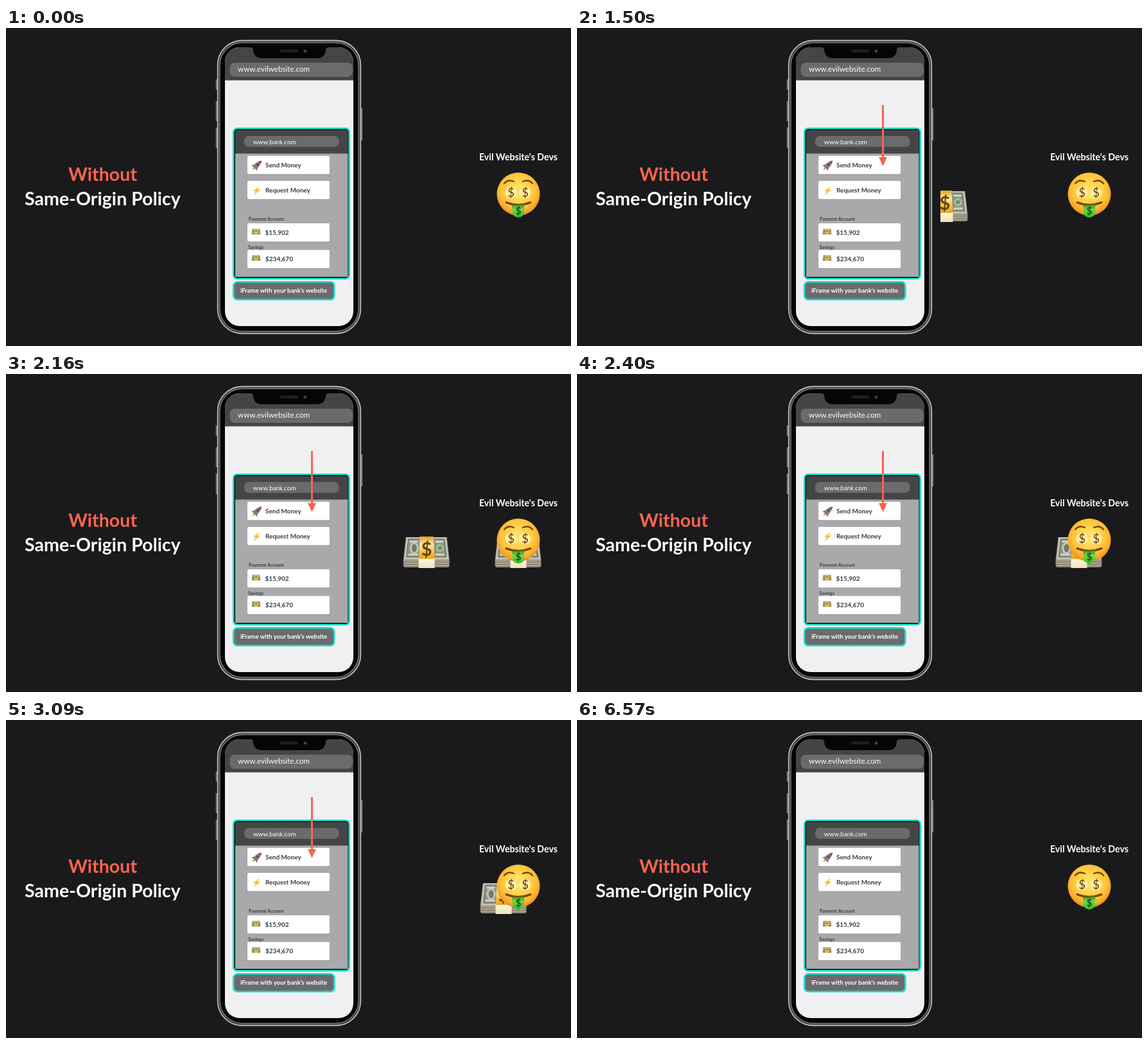
An HTML page that plays this animation: 880x495 px, repeating every 6.6 s.

```html
<!DOCTYPE html>
<html lang="en">
<head>
<meta charset="utf-8">
<title>Without Same-Origin Policy</title>
<style>
  html, body { margin: 0; height: 100%; overflow: hidden; background: #1a1a1c; }
  svg { display: block; width: 880px; height: 495px; font-family: Lato, sans-serif; fill: #fff; }
  .bold { font-weight: 700; }
  .mid { text-anchor: middle; }
  .title { font-size: 28.6px; }
  .dark { fill: #3c3c3e; }
  .item { font-size: 10px; }
  .tiny { font-size: 7px; }
  .pill { fill: #6b6b6d; }
  .teal { stroke: #14e0c9; stroke-width: 2.6; }
  .ink { fill: none; stroke: #7d3f0a; stroke-linecap: round; }
</style>
</head>
<body>
<svg viewBox="0 0 880 495">
  <defs>
    <radialGradient id="skin" cy=".42" r=".6">
      <stop offset=".2" stop-color="#ffe063"/><stop offset=".65" stop-color="#ffc438"/>
      <stop offset=".85" stop-color="#f9a52b"/><stop offset="1" stop-color="#e57e1e"/>
    </radialGradient>
    <linearGradient id="tongue" x2="0" y2="1">
      <stop offset="0" stop-color="#2f8c1a"/><stop offset=".4" stop-color="#6edb45"/><stop offset="1" stop-color="#35b52b"/>
    </linearGradient>
    <linearGradient id="strap" x2="0" y2="1">
      <stop offset="0" stop-color="#e0a325"/><stop offset=".25" stop-color="#ffe89a"/>
      <stop offset=".55" stop-color="#f3b82c"/><stop offset=".7" stop-color="#e5a824"/>
      <stop offset=".72" stop-color="#fff6d8"/><stop offset="1" stop-color="#f0e3bb"/>
    </linearGradient>
    <clipPath id="screen"><rect x="341" y="30" width="200" height="434" rx="23"/></clipPath>
    <clipPath id="gapWide"><rect x="566" width="314" height="495"/></clipPath>
    <clipPath id="gap"><rect x="554" width="326" height="495"/></clipPath>
    <g id="cash">
      <path d="M4 1H68L72 36V46L70 48H2L0 46V36Z" fill="#8a8573"/>
      <path d="M1 38H71M1 41.5H71M1 45H71" stroke="#c9c3ad" stroke-width="1.2"/>
      <path d="M5 1H67L71 36H1Z" fill="#c3c3b5"/>
      <path d="M8 4H64L67 32H5Z" fill="#8e9285" stroke="#62665b"/>
      <path d="M10 8H23M8 28H23M50 8H62M50 28H64" stroke="#d3d5c8" stroke-width="3"/>
      <ellipse cx="17" cy="18" rx="7" ry="9" fill="#c5c8b9"/>
      <ellipse cx="17" cy="18" rx="4" ry="6.500" fill="#74796c"/>
      <circle cx="57" cy="18" r="6" fill="#a9c2a0"/><circle cx="57" cy="18" r="3.500" fill="#649f62"/>
      <path d="M26 0H47L49 36V49H24V36Z" fill="url(#strap)"/>
      <text class="bold mid" x="36.500" y="30" font-size="29" fill="#65430f">$</text>
    </g>
    <g id="smallCash">
      <path d="M.8 0H12.700L13.500 6.500V8.500H0V6.500Z" fill="#89875f"/>
      <path d="M1.500 1H12L12.500 6H1Z" fill="#bcbf98"/>
      <circle cx="3" cy="3.500" r="1.300" fill="#737a53"/><circle cx="10.700" cy="3.500" r="1.300" fill="#6a9a59"/>
      <path d="M4.800 0H8.800L9 8.800H4.500Z" fill="#f3c640"/>
      <path d="M6.800 1.500V5.500" stroke="#76541b" stroke-width="1.300"/>
    </g>
  </defs>

  <text class="bold mid title" x="150.500" y="238" fill="#ff644e">Without</text>
  <text class="bold mid title" x="150.500" y="275.500">Same-Origin Policy</text>

  <g id="phone">
    <path d="M328 80V96M328 114V145M328 155V187M554 125V175" stroke="#77777a" stroke-width="2.500"/>
    <rect x="329.700" y="19.500" width="222.600" height="456" rx="38" fill="#38383b" stroke="#b9b9bc" stroke-width="1.800"/>
    <rect x="333" y="22.800" width="216" height="449.400" rx="35" fill="#050506" stroke="#8d8d90" stroke-width="1.200"/>
    <g clip-path="url(#screen)">
      <rect x="341" y="30" width="200" height="434" fill="#f0f0f3"/>
      <rect x="341" y="30" width="200" height="51.500" fill="#454547"/>
      <path d="M380 30Q385 30 385 34Q386 47 399 47H484Q497 47 498 34Q498 30 503 30Z" fill="#050506"/>
    </g>
    <rect x="427" y="33.500" width="28" height="4.500" rx="2.200" fill="#202024"/>
    <circle cx="466" cy="36" r="3" fill="#18252a"/><circle cx="466" cy="36" r="1.200" fill="#2c8d7c"/>
    <rect class="pill" x="348.500" y="54" width="191.500" height="22" rx="8"/>
    <text x="361" y="68" font-size="11.700">www.evilwebsite.com</text>
  </g>

  <g id="bank">
    <rect class="teal" x="354.300" y="156.300" width="180.400" height="234" rx="5.500" fill="#000"/>
    <rect x="357" y="159" width="175.500" height="37" fill="#454547"/>
    <rect x="357" y="195.500" width="175.500" height="192" fill="#a9a9ab"/>
    <rect class="pill" x="371" y="168" width="147.500" height="17" rx="7"/>
    <text x="385" y="180.500" font-size="9.800">www.bank.com</text>
    <g id="cards"></g>
    <text class="bold tiny dark" x="378" y="300">Payment Account</text>
    <text class="bold tiny dark" x="377.500" y="344">Savings</text>
    <use href="#smallCash" x="382.700" y="312.700"/>
    <use href="#smallCash" x="382.700" y="353.700"/>
    <g transform="translate(391 213.500) rotate(45)">
      <path d="M-2 5L0 11 2 5Z" fill="#ff9c24"/>
      <path d="M-3 1L-6 7-2 5M3 1L6 7 2 5" fill="#d83b31"/>
      <path d="M0-10Q6-1 2.500 6H-2.500Q-6-1 0-10Z" fill="#75818e"/>
      <path d="M0-10Q2-8 2.900-4.500H-2.900Q-2-8 0-10Z" fill="#d83b31"/>
      <circle cy="-1" r="1.600" fill="#274e75"/>
    </g>
    <path d="M395 246L384.500 254H389L385.500 260.500 396.500 251.500H391.500Z" fill="#fdbd3c"/>
    <rect class="teal pill" x="354.300" y="395.300" width="157" height="27.500" rx="6"/>
    <text class="bold mid" x="432.500" y="412" font-size="9.500">iFrame with your bank’s website</text>
  </g>

  <g id="arrow" fill="#f8644f">
    <path id="shaft" stroke="#f8644f" stroke-width="3"/>
    <path id="head" d="M-6.500-13H6.500L0 1Z"/>
  </g>

  <g id="bills"></g>

  <text class="bold mid" x="798" y="206" font-size="14.200">Evil Website's Devs</text>
  <g id="face">
    <circle cx="798" cy="258.500" r="33.500" fill="url(#skin)"/>
    <path class="ink" d="M776 242Q782 235 791 239M805 239Q814 235 820 242" stroke-width="2.400"/>
    <circle cx="786.500" cy="256.500" r="9" fill="#fff0a0"/><circle cx="808.500" cy="256.500" r="9" fill="#fff0a0"/>
    <g class="mid" font-size="18.500" fill="#663809">
      <text x="786.500" y="263">$</text><text x="808.500" y="263">$</text>
    </g>
    <path class="ink" d="M779 271.500Q798 279 817 271.500" stroke-width="3"/>
    <path d="M788 275Q798 277 807 274V288Q806 294 798 295Q790 294 789 288Z" fill="url(#tongue)"/>
    <text class="bold mid" x="798" y="290" font-size="15" fill="#174d12">$</text>
  </g>
</svg>
<script>
const LOOP = 6600;
const ARROW = { x: 476.5, top: 120, tip: 214, start: 120, duration: 1000, end: 6570 };
const PATH = { from: 480, to: 762, y: 253, fade: 80 };
const bills = [
  { start: 1214, duration: 972, clip: "gapWide" },
  { start: 1821, duration: 687, clip: "gap" },
  { start: 2277, duration: 1000, clip: "gapWide" },
];
const cards = [
  [199, 404, "Send Money"], [238, 404, "Request Money"],
  [304, 403.5, "$15,902"], [345.5, 404, "$234,670"],
];
const $ = id => document.getElementById(id);
const clamp = v => Math.min(1, Math.max(0, v));
const ease = u => (1 - Math.cos(Math.PI * clamp(u))) / 2;

$("cards").innerHTML = cards.map(([y, x, label]) => `
  <rect x="376" y="${y + .7}" width="128" height="28.5" rx="2" fill="#88888a"/>
  <rect x="376" y="${y}" width="128" height="28.5" rx="2"/>
  <text class="bold item dark" x="${x}" y="${y + 17.5}">${label}</text>`).join("");

$("bills").innerHTML = bills.map(b =>
  `<g clip-path="url(#${b.clip})"><use href="#cash"/></g>`).join("");
const notes = document.querySelectorAll("#bills use");

function draw(now) {
  const t = now % LOOP;
  const { x, top, tip, start, duration, end } = ARROW;
  const y = top + (tip - top) * ease((t - start) / duration);
  $("arrow").style.display = t >= start && t < end ? "" : "none";
  $("shaft").setAttribute("d", `M${x} ${top}V${Math.max(top, y - 10)}`);
  const size = clamp((y - top) / 14);
  $("head").setAttribute("transform", `translate(${x} ${y}) scale(${size})`);

  bills.forEach((b, i) => {
    const age = t - b.start;
    const left = PATH.from + (PATH.to - PATH.from) * ease(age / b.duration);
    notes[i].setAttribute("transform", `translate(${left} ${PATH.y})`);
    notes[i].style.opacity = age < 0 ? 0 : clamp(1 - (age - b.duration) / PATH.fade);
  });
  requestAnimationFrame(draw);
}
requestAnimationFrame(draw);
</script>
</body>
</html>
```
